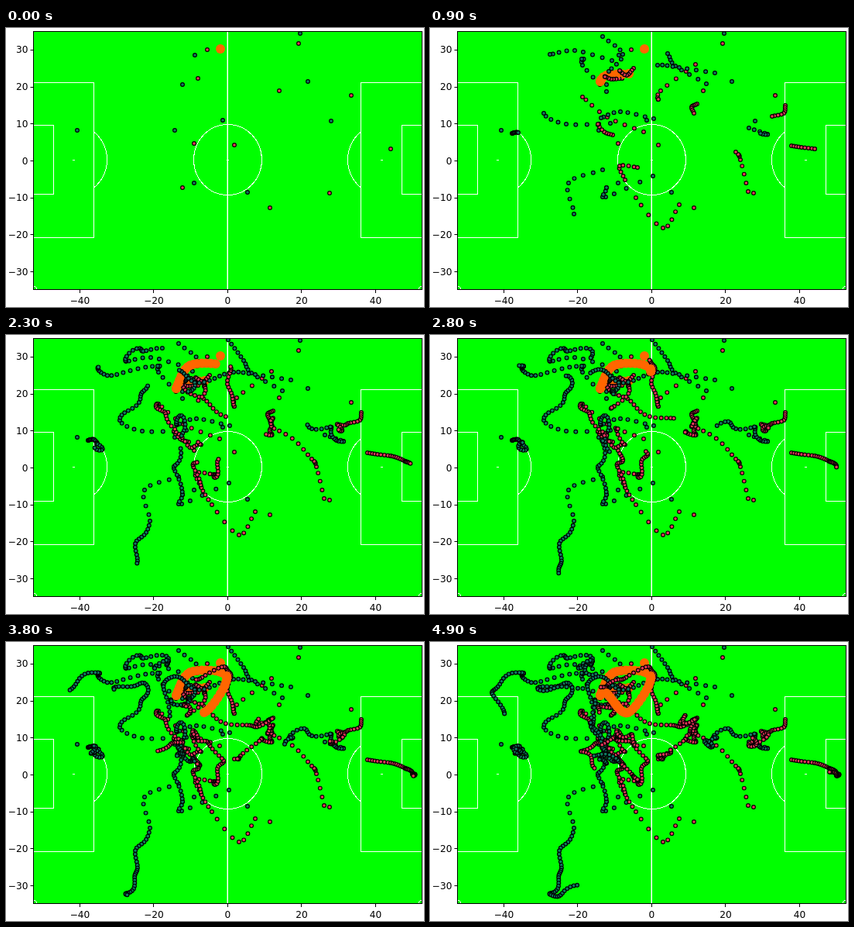
Animation of 540 by 360 pixels, one loop 5 s. Source, as an HTML page:

```html
<!DOCTYPE html>
<html lang="en">
<head>
<meta charset="utf-8">
<title>Match tracking</title>
<style>
  html, body { margin: 0; width: 100%; height: 100%; overflow: hidden; background: #fff; }
  svg { display: block; width: 540px; height: 360px; }
  text { font: 12.2px "DejaVu Sans", sans-serif; fill: #000; }
  .pitch { fill: none; stroke: #fff; shape-rendering: crispEdges; }
  .axis { fill: none; stroke: #000; }
  .red, .teal { stroke: #000; stroke-width: 1.15; }
  .red { fill: #e8345a; }
  .teal { fill: #0f7a62; }
  .ball { fill: #ff6600; }
</style>
</head>
<body>
<svg viewBox="0 0 540 360">
  <clipPath id="field"><rect x="35.5" y="4.5" width="502" height="333"/></clipPath>
  <rect x="35.5" y="4.5" width="502" height="333" fill="#0f0"/>
  <g class="pitch" clip-path="url(#field)">
    <path d="M286.25 4V339" stroke-width="1.5" shape-rendering="auto"/>
    <ellipse cx="286.5" cy="170" rx="44" ry="45.5"/>
    <path d="M35 70.5H113.5V270.5H35M35 125.5H61.5V214.5H35"/>
    <path d="M538 70.5H458.5V270.5H538M538 125.5H511.5V214.5H538"/>
    <path d="M113.5 134A44 45.5 0 0 1 113.5 206M458.5 134A44 45.5 0 0 0 458.5 206"/>
    <path d="M86 170.5h3M285 170.5h3M484 170.5h3"/>
    <path d="M35 333a5 5 0 0 1 5 5M538 333a5 5 0 0 0 -5 5"/>
  </g>
  <g id="dots" clip-path="url(#field)"></g>
  <g id="axes" class="axis"><rect x="35.5" y="4.5" width="502" height="333"/></g>
  <g id="labels"></g>
</svg>
<script>
const FRAMES = 50, STEP = 100;
const TIMES = [1, 5, 9, 17, 27, 38, 49];   // frames at which every track has a key point
const $ = id => document.getElementById(id);

function add(parent, tag, attrs, text) {
  const el = document.createElementNS('http://www.w3.org/2000/svg', tag);
  for (const k in attrs) el.setAttribute(k, attrs[k]);
  if (text) el.textContent = text;
  return parent.appendChild(el);
}

const label = n => String(n).replace('-', '\u2212');

for (let v = -40; v <= 40; v += 20) {
  const x = 286.5 + v * 4.775;
  add($('axes'), 'path', { d: `M${Math.round(x) - .5} 338v4` });
  add($('labels'), 'text', { x, y: 356, 'text-anchor': 'middle' }, label(v));
}
for (let v = -30; v <= 30; v += 10) {
  const y = 171 - v * 4.77;
  add($('axes'), 'path', { d: `M35.5 ${Math.round(y) + .5}h-4` });
  add($('labels'), 'text', { x: 28.5, y: y + 4.5, 'text-anchor': 'end' }, label(v));
}

let seed = 7;
const random = () => (seed = seed * 16807 % 2147483647) / 2147483647;

// Hermite spline through one coordinate of the key points
function spline(v, t) {
  const last = v.length - 1;
  let i = 0;
  while (i < last - 1 && TIMES[i + 1] <= t) i++;
  const slope = k => {
    const a = Math.max(k - 1, 0), b = Math.min(k + 1, last);
    return (v[b] - v[a]) / (TIMES[b] - TIMES[a]);
  };
  const h = TIMES[i + 1] - TIMES[i], u = (t - TIMES[i]) / h;
  const ma = slope(i) * h, mb = slope(i + 1) * h, d = v[i + 1] - v[i];
  return v[i] + u * (ma + u * (3 * d - 2 * ma - mb + u * (ma + mb - 2 * d)));
}

// Seeded sway that sets in once the play has settled
function sway(size) {
  const rate = .45 + random() * .3, phase = random() * 7;
  return t => size * Math.min(1, Math.max(0, (t - 9) / 8)) * Math.sin(t * rate + phase);
}

const layers = Array.from({ length: FRAMES }, () => add($('dots'), 'g', {}));

// The first point is the opening position, the rest belong to TIMES
function track(kind, points, size = 3) {
  const [start, ...keys] = points.split(', ').map(p => p.split(' ').map(Number));
  const xs = keys.map(p => p[0]), ys = keys.map(p => p[1]);
  const dx = sway(size), dy = sway(size);
  layers.forEach((layer, n) => {
    const [cx, cy] = n ? [spline(xs, n) + dx(n), spline(ys, n) + dy(n)] : start;
    add(layer, 'circle', { class: kind, cx: cx.toFixed(1), cy: cy.toFixed(1), r: kind === 'ball' ? 6 : 2.4 });
  });
}

track('ball', '277 27, 257 59, 228 61, 220 69, 238 39, 285 44, 256 91, 228 66', 0);

track('red', '497 156, 467 152, 480 154, 497 156, 515 162, 525 169, 527 172, 517 167', 1);
track('red', '341 232, 322 228, 301 258, 266 219, 246 180, 247 156, 250 160, 270 180');
track('red', '228 206, 252 196, 245 178, 268 180, 270 180, 278 150, 248 125, 225 130');
track('red', '418 213, 411 211, 401 170, 395 160, 346 114, 341 114, 325 99, 338 103', 4);
track('red', '353 81, 345 98, 338 102, 341 110, 343 126, 330 127, 296 151, 312 137');
track('red', '378 20, 343 47, 298 81, 295 92, 288 62, 286 33, 244 49, 220 60', 2);
track('red', '446 87, 459 100, 457 110, 442 114, 430 119, 434 122, 416 132, 420 128', 4);
track('red', '295 151, 276 134, 229 115, 197 89, 202 102, 226 129, 198 138, 215 160');
track('red', '243 149, 236 138, 225 134, 217 124, 246 146, 245 125, 246 118, 271 130', 4);
track('red', '260 28, 263 52, 254 61, 245 55, 260 68, 237 91, 232 80, 215 92', 4);
track('red', '248 65, 248 65, 234 66, 226 63, 252 85, 308 110, 341 102, 330 124');

track('teal', '92 132, 106 136, 109 135, 114 135, 121 145, 116 142, 112 138, 115 142', 4);
track('teal', '243 200, 223 183, 179 200, 186 240, 169 271, 168 306, 157 328, 189 315', 2);
track('teal', '312 212, 288 191, 227 218, 228 206, 220 170, 226 138, 225 150, 223 155', 4);
track('teal', '280 119, 289 117, 246 108, 221 116, 228 107, 230 147, 245 152, 214 144');
track('teal', '218 132, 233 123, 176 124, 147 110, 173 84, 180 55, 141 61, 196 58', 2);
track('teal', '228 73, 228 82, 197 48, 196 40, 129 51, 117 38, 82 61, 97 92', 2);
track('teal', '244 35, 235 42, 187 29, 155 34, 173 17, 211 25, 195 30, 211 40', 4);
track('teal', '223 -9, 223 11, 249 34, 231 56, 240 60, 235 78, 210 80, 217 132', 4);
track('teal', '380 7, 357 72, 317 49, 307 33, 275 -9, 240 -50, 235 -50, 235 -50', 0);
track('teal', '390 69, 368 58, 322 51, 294 48, 247 60, 210 44, 209 94, 220 125');
track('teal', '420 120, 412 129, 436 137, 427 136, 415 121, 375 116, 364 131, 357 130', 4);

let shown = -1;
function tick() {
  const frame = Math.floor(performance.now() / STEP) % FRAMES;
  if (frame !== shown) {
    layers.forEach((g, n) => { g.style.display = n <= frame ? '' : 'none'; });
    shown = frame;
  }
  requestAnimationFrame(tick);
}
tick();
</script>
</body>
</html>
```
